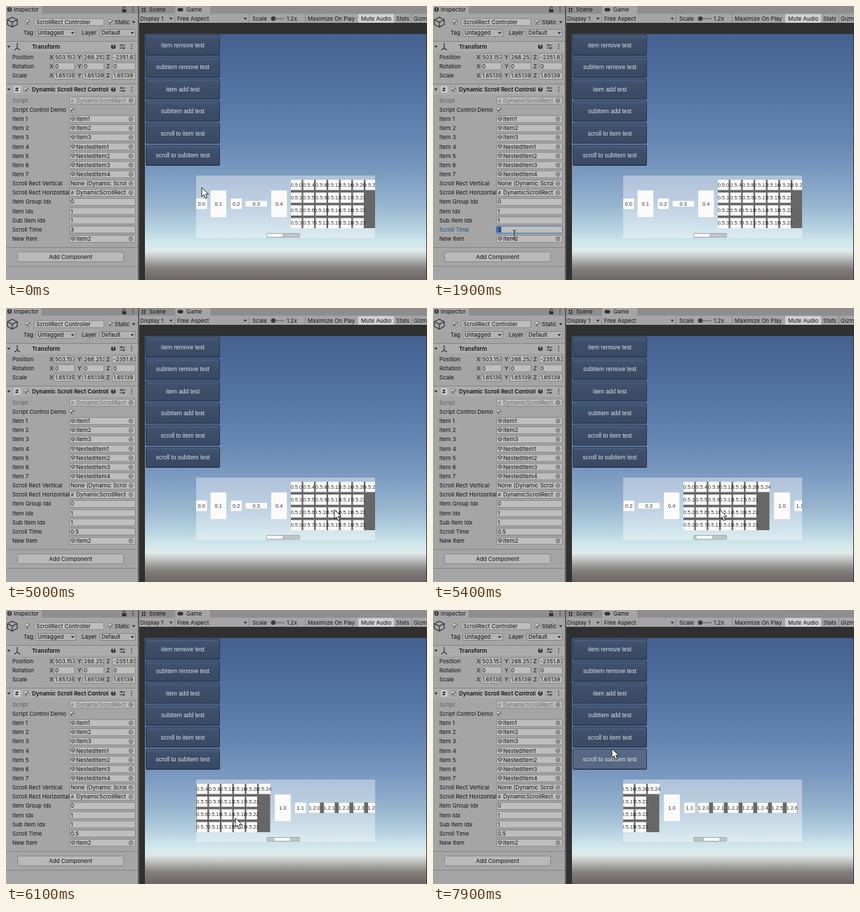
An HTML page that plays this animation: 600 by 391 pixels, repeating every 8000 ms.

```html
<!DOCTYPE html>
<html lang="en">
<head>
<meta charset="utf-8">
<title>Dynamic scroll rect</title>
<style>
html, body { margin: 0; width: 100%; height: 100%; overflow: hidden; background: #303030; }
svg { display: block; }
text { font: 8px Inter, "Open Sans", sans-serif; fill: #111; white-space: pre; }
.game text { font: 7.4px "Liberation Sans", Arial, sans-serif; fill: #333; text-anchor: middle; }
.game .button text { font-size: 8.4px; fill: #dde0e4; }
</style>
</head>
<body>
<svg id="stage" width="600" height="391" viewBox="0 0 600 391"></svg>
<script>
const LOOP = 8000, STEP = 100;
const PANEL = '#a5a5a5', FIELD = '#bebebe', EDGE = '#7c7c7c', INK = '#303030';

const rect = (x, y, w, h, fill, extra = '') =>
  `<rect x="${x}" y="${y}" width="${w}" height="${h}" fill="${fill}" ${extra}/>`;
const path = (d, extra = '') => `<path d="${d}" fill="none" stroke="${INK}" ${extra}/>`;
const label = (x, middle, text, extra = '') =>
  `<text x="${x}" y="${middle + 2.8}" ${extra}>${text}</text>`;
const clip = (x, y, w, h, content, extra = '') =>
  `<svg x="${x}" y="${y}" width="${w}" height="${h}" viewBox="${x} ${y} ${w} ${h}" ${extra}>${content}</svg>`;
const range = (n, make) => Array.from({ length: n }, (_, i) => make(i)).join('');
const bold = 'style="font-weight:600"';

const box = (x, y, w, h = 11, fill = FIELD) =>
  rect(x + .5, y - h / 2 + .5, w - 1, h - 1, fill, `rx="1.5" stroke="${EDGE}" stroke-width=".8"`);
const field = (x, y, w, text, indent = 2, room = w - 1, extra = '') =>
  box(x, y, w) + clip(x, y - 6, room, 12, label(x + indent, y, text, extra));
const check = (x, y) =>
  box(x - 4, y, 8, 8, '#c6c6c6') + path(`M${x - 2} ${y}l1.5 2l3-4`, 'stroke-width="1.1"');
const arrow = (x, y) => `<path d="M${x - 2.5} ${y - 1.2}h5l-2.5 3z" fill="${INK}"/>`;
const kebab = (x, y) => range(3, i => rect(x - .7, y - 3.7 + i * 3, 1.4, 1.4, INK));
const cube = (x, y, r, width) =>
  path(`M${x} ${y - r}l${r} ${r / 2}v${r}l${-r} ${r / 2}l${-r} ${-r / 2}v${-r}zm${-r} ${r / 2}l${r} ${r / 2}l${r} ${-r / 2}m${-r} ${r / 2}v${r}`,
    `stroke-width="${width}"`);
const rule = y => rect(0, y, 188, 1, '#858585');

function header(y, title) {
  return rule(y - 8) + rect(0, y - 7, 188, 14, '#acacac') +
    arrow(4, y) +
    clip(36, y - 7, 110, 14, label(37, y, title, bold)) +
    `<circle cx="153" cy="${y}" r="3.3" fill="${INK}"/>` +
    `<text x="151.3" y="${y + 2.1}" style="font-size:6px;font-weight:700;fill:#ccc">?</text>` +
    path(`M162 ${y - 2}h8M162 ${y + 2}h8M164.5 ${y - 3.8}v3.6M167.5 ${y + .2}v3.6`) +
    kebab(179, y);
}

function vectorRow(y, name, values) {
  const columns = [['X', 62, 68, 30], ['Y', 102, 109, 31], ['Z', 143, 151, 34]];
  return label(9, y, name) + columns.map(([axis, x, left, w], i) =>
    label(x, y, axis) + field(left, y, w, values[i])).join('');
}

const rowY = i => 135 + 13.15 * i;

function objectField(y, text, icon = true, faded = false) {
  const tint = faded ? 'fill-opacity=".5"' : '';
  const mark = !icon ? '' : faded || text.startsWith('Dyn')
    ? label(92.5, y, '#', 'style="font-size:6.5px" ' + tint) : cube(95.5, y - .5, 2.7, .7);
  return field(90, y, 95, text, icon ? 10 : 2, 82, tint) + mark +
    `<circle cx="178" cy="${y}" r="2.8" fill="none" stroke="#444" stroke-width=".8"/><circle cx="178" cy="${y}" r="1" fill="#444"/>`;
}

function inspector() {
  const rows = [
    ['Script', y => objectField(y, 'DynamicScrollRectController', true, true)],
    ['Script Control Demo', y => check(94, y)],
    ...['Item1', 'Item2', 'Item3', 'NestedItem1', 'NestedItem2', 'NestedItem3', 'NestedItem4']
      .map((text, i) => ['Item ' + (i + 1), y => objectField(y, text)]),
    ['Scroll Rect Vertical', y => objectField(y, 'None (Dynamic Scroll Rect)', false)],
    ['Scroll Rect Horizontal', y => objectField(y, 'DynamicScrollRect')],
    ['Item Group Idx', y => field(90, y, 95, '0')],
    ['Item Idx', y => field(90, y, 95, '1')],
    ['Sub Item Idx', y => field(90, y, 95, '1')],
    ['Scroll Time', y => `<g id="time"><rect x="90.5" y="${y - 5}" width="94" height="10" rx="1.5" fill="${FIELD}"/>` +
      rect(91, y - 4.5, 6.5, 9, '#3d75b8', 'id="selection"') + label(92, y, '3', 'id="value"') + '</g>'],
    ['New Item', y => objectField(y, 'Item2')]
  ];
  return rect(0, 0, 188, 391, PANEL) +
    rect(0, 0, 188, 11, '#8e8e8e') + rect(0, 0, 51, 11, PANEL) +
    `<circle cx="5" cy="5" r="3.2" fill="${INK}"/>` + rect(4.5, 3, 1, 4, '#ccc') + label(11, 5, 'Inspector') +
    rect(165.5, 4.5, 6, 4.5, INK) + path('M166.8 5V3a1.8 1.8 0 0 1 3.6 0') + kebab(181, 5) +
    cube(9, 23, 7, 1.2) + check(31, 23) + field(40, 23, 100, 'ScrollRect Controller', 3) +
    check(149, 23) + label(155, 23, 'Static') + arrow(182, 23) +
    label(25, 38.5, 'Tag') + box(42, 38.5, 58, 11, '#b4b4b4') + label(45, 38.5, 'Untagged') + arrow(95, 38.5) +
    label(108, 38.5, 'Layer') + box(133, 38.5, 52, 11, '#b4b4b4') + label(136, 38.5, 'Default') + arrow(180, 38.5) +
    header(58, 'Transform') +
    path('M16 53v7l-4 3m4-3l4 3', 'stroke-width="1.2"') +
    vectorRow(73, 'Position', ['503.157', '268.252', '-2351.83']) +
    vectorRow(86, 'Rotation', ['0', '0', '0']) +
    vectorRow(99.5, 'Scale', ['1.65139', '1.65139', '1.65139']) +
    header(119, 'Dynamic Scroll Rect Controller') +
    rect(11.5, 114.5, 9, 9, '#d2d2d2', 'rx="1"') + label(13, 119, '#', bold) + check(29, 119) +
    rows.map(([name, make], i) => {
      const extra = name === 'Scroll Time' ? 'id="timeLabel"' : i ? '' : 'fill-opacity=".5"';
      return clip(0, rowY(i) - 6, 90, 12, label(9, rowY(i), name, extra)) + make(rowY(i));
    }).join('') +
    rule(344) + box(16, 358, 152, 15, '#b9b9b9') +
    label(92, 358, 'Add Component', 'text-anchor="middle"') + rule(371);
}

function toolbar() {
  const divider = x => rect(x, 12, 1, 12, '#888');
  return rect(190, 0, 410, 11, '#8e8e8e') + rect(241, 0, 50, 11, PANEL) +
    path('M194.5 2v7M197.5 2v7M193 3.8h6.5M193 7.2h6.5', 'stroke-width=".9"') + label(204, 5, 'Scene') +
    rect(244.5, 2.8, 8, 5, INK, 'rx="2.5"') + label(257, 5, 'Game') +
    rect(190, 11, 410, 13, PANEL) +
    label(191, 18, 'Display 1') + arrow(235, 18) + divider(240) +
    label(244, 18, 'Free Aspect') + arrow(341, 18) + divider(346) +
    label(351, 18, 'Scale') + rect(377, 17.5, 20, 1.2, '#666') +
    `<circle cx="381" cy="18" r="3.2" fill="#3b3b3b"/>` + label(400, 18, '1.2x') + divider(426) +
    label(430, 18, 'Maximize On Play') + rect(502, 11.5, 51, 12.5, '#d0d0d0') +
    label(506, 18, 'Mute Audio') + label(556, 18, 'Stats') + divider(578) + label(581, 18, 'Gizmos');
}

const tile = (x, y, w, h, text) =>
  rect(x, y, w, h, '#fbfbfb', 'rx=".8"') + `<text x="${x + w / 2}" y="${y + h / 2 + 2.6}">${text}</text>`;
const item = (x, w, h, text) => tile(x, 282.2 - h / 2, w, h, text);

function scrollContent() {
  const cellX = i => 406 + 17.7 * (i >> 2), cellY = i => 248 + 18.2 * (i % 4);
  return item(271, 15.5, 15, '0.0') + item(291.5, 22.5, 38, '0.1') + item(320.5, 15.5, 15, '0.2') +
    item(341.5, 30.5, 8, '0.3') + item(378, 22.3, 38, '0.4') +
    rect(406, 248, 122.5, 69, '#676767') +
    range(25, i => rect(cellX(i), cellY(i), i === 24 ? 16.8 : 15.4, 14.6, '#fbfbfb')) +
    range(25, i => `<text x="${cellX(i) + 7.9}" y="${cellY(i) + 9.8}">0.5.${i}</text>`) +
    item(535, 22.8, 38, '1.0') + item(564, 15.5, 15, '1.1') +
    rect(584, 274.7, 142, 15, '#676767') + range(7, i => item(584 + 21 * i, 15.5, 15, '1.2.' + i));
}

function game() {
  const sky = [[40, '#44618f'], [120, '#5373a3'], [190, '#6686b3'], [240, '#7c9bc1'], [285, '#98b5cf'],
    [315, '#b3d0df'], [336, '#cfe6ec'], [349, '#dfebea'], [357, '#c6cccb'], [366, '#a2a2a0'], [375, '#827e7b'], [391, '#6b6663']];
  const names = ['item remove test', 'subItem remove test', 'item add test', 'subItem add test', 'scroll to item test', 'scroll to subItem test'];
  const button = (name, i) => {
    const y = 41 + 31.4 * i;
    return '<g class="button">' + rect(199, y, 106, 30, '#26344c', 'rx="2"') +
      rect(199.8, y + .8, 104.4, 27.8, 'url(#buttonFill)', `rx="1.5" ${i === 5 ? 'id="last"' : ''}`) +
      `<text x="252" y="${y + 18}">${name}</text></g>`;
  };
  return `<defs><linearGradient id="sky" gradientUnits="userSpaceOnUse" x1="0" x2="0" y1="40" y2="391">${
    sky.map(([y, c]) => `<stop offset="${(y - 40) / 351}" stop-color="${c}"/>`).join('')}</linearGradient>
    <linearGradient id="buttonFill" x2="0" y2="1"><stop stop-color="#4a5c78"/><stop offset=".2" stop-color="#3f506c"/><stop offset="1" stop-color="#394963"/></linearGradient></defs>` +
    '<g class="game">' + rect(198, 40, 401, 351, 'url(#sky)') + names.map(button).join('') +
    rect(271, 242, 255, 89, '#fff', 'fill-opacity=".38"') +
    clip(271, 242, 255, 89, `<g id="content">${scrollContent()}</g>`) +
    rect(371.5, 324.5, 47, 5.5, '#bfc5c8', 'rx="1" stroke="#929da3" stroke-width=".8"') +
    rect(371.5, 324.5, 23.5, 5.5, '#f6f8f8', 'id="handle" rx="1" stroke="#929da3" stroke-width=".8"') + '</g>';
}

document.getElementById('stage').innerHTML =
  rect(0, 0, 600, 391, INK) + game() + toolbar() + inspector() + rect(188, 0, 2, 391, '#5c5c5c') +
  '<path id="pointer" d="M0 0V13L3 10.3L5.3 15.3L7.6 14.2L5.4 9.4H9.6Z" fill="#fff" stroke="#111" stroke-width=".9"/>' +
  path('M-2.5 -6Q0 -6 0 -4.5Q0 -6 2.5 -6M0 -5V5.5M-2.5 6.5Q0 6.5 0 5Q0 6.5 2.5 6.5', 'id="beam"');

// [time, x, y]
const pointerPath = [
  [100, 279, 259], [300, 243, 274], [600, 140, 314], [750, 102, 331], [1000, 116, 326], [3600, 116, 326],
  [3800, 160, 308], [4100, 300, 268], [4500, 440, 263], [4800, 466, 284], [5000, 468, 288], [5400, 409, 288],
  [5800, 320, 295], [5900, 317, 297], [6100, 327, 297], [6500, 385, 294], [6800, 410, 292], [7100, 376, 290],
  [7400, 376, 290], [7600, 335, 262], [7800, 268, 210], [7900, 255, 198]
];
// [time, distance]
const scrollPath = [
  [5000, 0], [5100, 5], [5400, 49], [5600, 91], [5800, 130], [5900, 141], [6100, 152],
  [6400, 167], [6600, 175], [6800, 181], [7100, 206]
];
// [time, text in the edited field]
const typing = [[0, '3'], [2600, '0'], [2800, '0.'], [3200, '0.5']];

function sample(keys, t, column) {
  const next = keys.findIndex(key => key[0] > t);
  if (next < 0) return keys[keys.length - 1][column];
  if (next === 0) return keys[0][column];
  const a = keys[next - 1], b = keys[next];
  return a[column] + (b[column] - a[column]) * (t - a[0]) / (b[0] - a[0]);
}

const part = Object.fromEntries([...document.querySelectorAll('[id]')].map(node => [node.id, node]));
const show = (node, on) => node.setAttribute('visibility', on ? 'visible' : 'hidden');

function draw(now) {
  const t = Math.floor(now % LOOP / STEP) * STEP;
  const scroll = sample(scrollPath, t, 1);
  part.content.setAttribute('transform', `translate(${-scroll} 0)`);
  part.handle.setAttribute('x', 371.5 + scroll * .068);

  const overField = t >= 900 && t < 3700;
  const place = `translate(${sample(pointerPath, t, 1)} ${sample(pointerPath, t, 2)})`;
  for (const name of ['pointer', 'beam']) part[name].setAttribute('transform', place);
  show(part.pointer, !overField);
  show(part.beam, overField);

  const focused = t >= 1800 && t < 4400;
  part.timeLabel.style.fill = focused ? '#174f91' : '';
  part.time.firstChild.setAttribute('stroke', focused ? '#3d75b8' : EDGE);
  show(part.selection, focused && t < 2600);
  part.value.textContent = typing.filter(([start]) => start <= t).pop()[1];
  part.last.setAttribute('fill', t >= 7900 ? '#566883' : 'url(#buttonFill)');
}

function tick() {
  draw(performance.now());
  requestAnimationFrame(tick);
}
tick();
</script>
</body>
</html>
```
